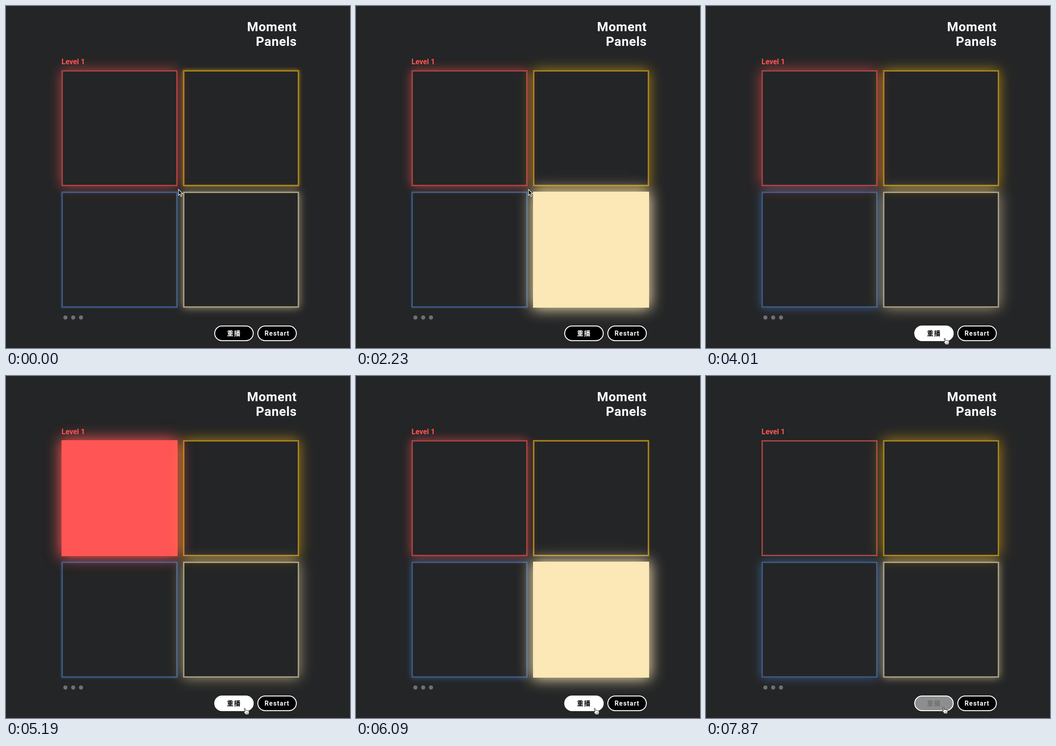
An HTML page for the animation above (8 s loop, 750x746 px).

```html
<!DOCTYPE html>
<html lang="en">
<head>
<meta charset="utf-8">
<title>Moment Panels</title>
<style>
  html, body { margin: 0; width: 100%; height: 100%; overflow: hidden; background: #242526; }
  body { position: relative; font-family: Roboto, "Noto Sans CJK TC", "Noto Sans CJK SC", "Noto Sans CJK JP", sans-serif; font-weight: 700; color: #fff; }
  body > * { position: absolute; box-sizing: border-box; }
  h1 { margin: 0; top: 30px; right: 116px; font-size: 28px; line-height: 32px; letter-spacing: .6px; text-align: right; }
  .level { left: 121px; top: 112px; font-size: 16px; line-height: 20px; color: #ff5555; }
  .block { width: 253px; height: 253px; border: 3px solid; }
  .dot { top: 674.5px; width: 9px; height: 9px; border-radius: 50%; background: #707071; }
  .button { top: 697px; width: 86px; height: 34px; border: 2px solid #fff; border-radius: 17px;
    background: #000; font-size: 14px; line-height: 30px; letter-spacing: 1.2px; text-align: center; }
  .edge { left: 0; bottom: 0; width: 100%; height: 1px; background: #2d2026; }
  svg { left: 0; top: 0; overflow: visible; }
</style>
</head>
<body>
<h1>Moment<br>Panels</h1>
<div class="level">Level 1</div>
<div class="dot" style="left:124.5px"></div>
<div class="dot" style="left:141.5px"></div>
<div class="dot" style="left:158.5px"></div>
<div class="button" id="replay" style="left:454px">重播</div>
<div class="button" style="left:548px">Restart</div>
<div class="edge"></div>
<svg id="cursor" width="20" height="22">
  <path id="arrow" d="M0 0V13L3 10.3L5.2 15.2L7.6 14.2L5.5 9.5H9.4Z" fill="#111" stroke="#fff" stroke-width="1.1"/>
  <g id="hand">
    <path d="M-.6 1C-.6-.5 1.2-.6 1.7.8L3 5C4.4 4.1 5.2 4.6 5.6 5.3C6.7 4.7 7.7 5 8 5.8C9.3 5.4 10.1 6.1 10.1 7.4C10.2 9.7 9.6 11.3 8.8 13.5H2.6C1.5 11.4-.4 9.7-1.6 8.3C-2.1 7.2-.6 6.6 1 8Z" fill="#fff" stroke="#111" stroke-width="1"/>
    <path d="M4 9.2V11.5M5.8 9.2V11.5M7.6 9.2V11.5" stroke="#111" stroke-width=".8"/>
  </g>
</svg>
<script>
const LOOP = 8000;
const $ = id => document.getElementById(id);
const clamp = x => Math.min(1, Math.max(0, x));

// low: time of the weakest glow; lit: [start, hold, peak] of each highlight
const blocks = [
  { x: 121, y: 140, rgb: "255,85,85", period: 1485, low: 445, size: 30, lit: [[1230, 400, 1], [5080, 400, 1]] },
  { x: 386, y: 140, rgb: "253,190,20", period: 2970, low: 185, size: 30, lit: [] },
  { x: 121, y: 405, rgb: "75,124,192", period: 742.5, low: 30, size: 21, lit: [[2600, 200, .9]] },
  { x: 386, y: 405, rgb: "251,232,182", period: 1485, low: 225, size: 30, lit: [[2120, 400, 1], [5975, 400, 1]] }
];

for (const b of blocks) {
  b.el = document.createElement("div");
  b.el.className = "block";
  b.el.style.cssText = `left:${b.x}px;top:${b.y}px;border-color:rgb(${b.rgb})`;
  document.body.insertBefore(b.el, $("cursor"));
}

// [time, x, y] of the pointer tip
const path = [
  [0, 376, 400], [2480, 376, 400], [2970, 357, 682], [3250, 420, 748],
  [3450, 490, 748], [3750, 520, 725], [6500, 520, 725], [6800, 520, 758],
  [7550, 517, 758], [7850, 517, 723], [LOOP, 517, 723]
];

function pointerAt(t) {
  const i = Math.max(1, path.findIndex(p => p[0] > t));
  const [a, b] = [path[i - 1], path[i]];
  const u = (t - a[0]) / (b[0] - a[0]);
  const k = u * u * (3 - 2 * u);
  return [a[1] + (b[1] - a[1]) * k, a[2] + (b[2] - a[2]) * k];
}

function breath(t, { period, low }) {
  const phase = ((t - low) % period + period) % period;
  const fromLow = Math.min(phase, period - phase) / (period / 2);
  return 1 - (1 - fromLow) ** 2.4;
}

function highlight(t, [start, hold, peak]) {
  return peak * Math.min(clamp((t - start) / 100), clamp(1 - (t - start - 100 - hold) / 220));
}

function render(t) {
  for (const b of blocks) {
    const lit = Math.max(0, ...b.lit.map(h => highlight(t, h)));
    const glow = Math.max(b.size * breath(t, b), 30 * lit);
    b.el.style.opacity = .6 + .4 * lit;
    b.el.style.backgroundColor = `rgba(${b.rgb},${lit})`;
    b.el.style.boxShadow = glow < .6 ? "none" : `0 0 ${glow}px ${2 * lit}px rgb(${b.rgb})`;
  }

  const hover = t < 7000
    ? Math.min(clamp((t - 3650) / 200), clamp(1 - (t - 6620) / 200))
    : clamp((t - 7760) / 200);
  const shade = Math.round(255 * hover);
  $("replay").style.background = `rgb(${shade},${shade},${shade})`;
  $("replay").style.color = `rgb(${255 - shade},${255 - shade},${255 - shade})`;

  const [x, y] = pointerAt(t);
  const pointing = t > 2560 && t < 3010 || t > 3600;
  $("cursor").style.transform = `translate(${x}px,${y}px)`;
  $("arrow").style.display = pointing ? "none" : "";
  $("hand").style.display = pointing ? "" : "none";
}

const start = performance.now();
function frame() {
  render((performance.now() - start) % LOOP);
  requestAnimationFrame(frame);
}
frame();
</script>
</body>
</html>
```
